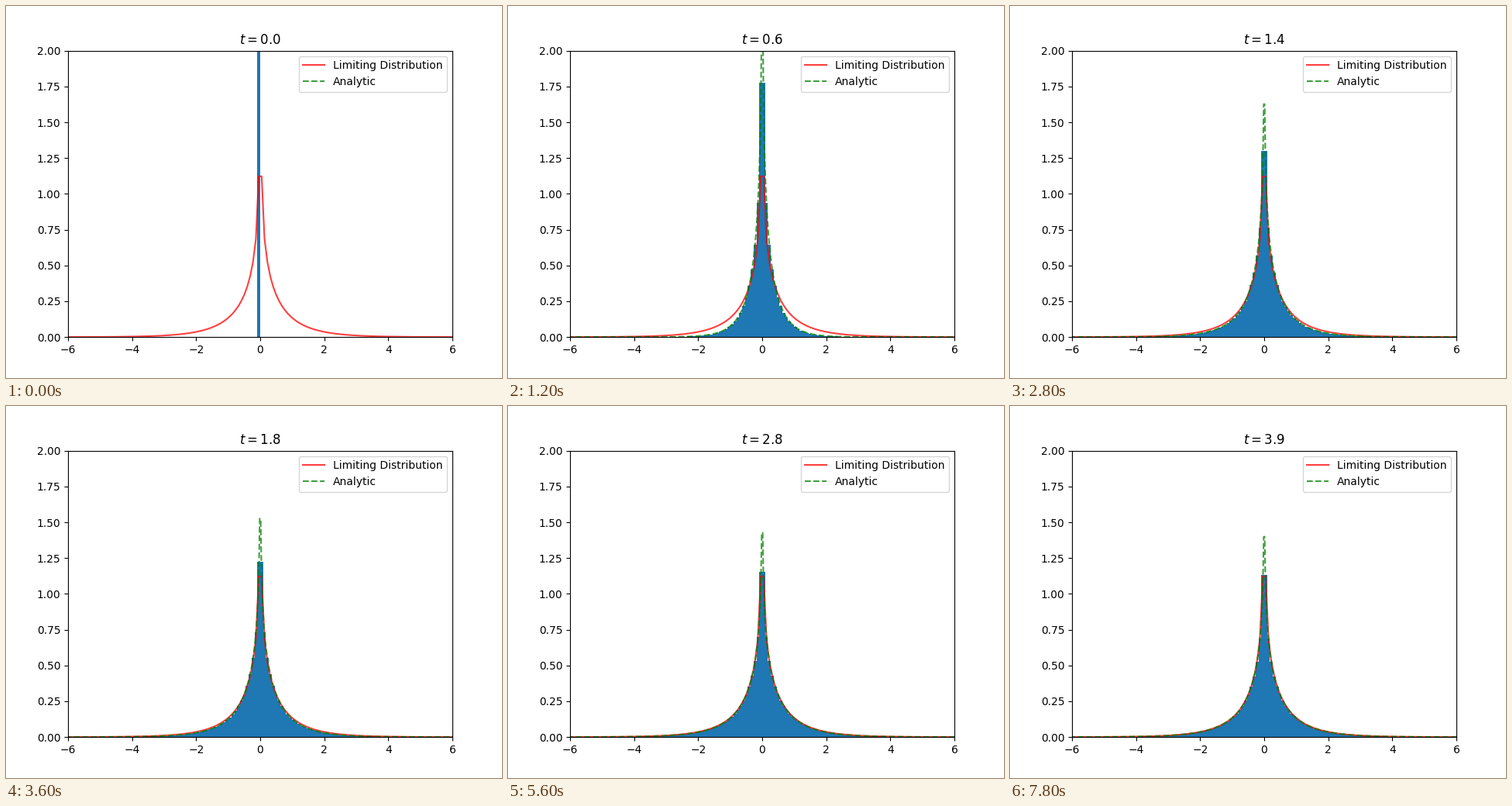
Write a matplotlib script that moves like this. It is 640 by 480 pixels and loops after 8 s.

```python
import numpy as np
import matplotlib.pyplot as plt
from matplotlib.animation import FuncAnimation

FRAMES, INTERVAL = 40, 200
RATE = 1.2      # relaxation rate of the scale
BIN = 0.09      # histogram bin width

U = np.linspace(0, 25, 501)
COSH = np.cosh(U)


def integrate(f):
    """Trapezoid rule along the last axis, over U."""
    return (f.sum(axis=-1) - 0.5 * (f[..., 0] + f[..., -1])) * (U[1] - U[0])


def density(x, scale):
    """Density K0(|x| / scale) / (pi * scale)."""
    z = np.abs(x)[:, None] / scale
    return integrate(np.exp(-z * COSH)) / (np.pi * scale)


def cumulative(x, scale):
    """Probability between 0 and x."""
    z = np.abs(x)[:, None] / scale
    return np.sign(x) * integrate(-np.expm1(-z * COSH) / COSH) / np.pi


def bin_heights(scale):
    if scale == 0:
        return np.where(np.arange(len(edges) - 1) == zero_bin, 1 / BIN, 0.0)
    return np.diff(cumulative(edges, scale)) / BIN


edges = BIN * np.arange(-100, 101)
zero_bin = 99
x = np.linspace(-10, 10, 700)

fig, ax = plt.subplots(figsize=(6.4, 4.8), dpi=100)
bars = ax.bar(edges[:-1], bin_heights(0), width=BIN, align="edge", color="C0")
ax.plot(edges[:-1] + BIN / 2, bin_heights(1), color="red", alpha=0.75,
        label="Limiting Distribution")
curve, = ax.plot(x, np.full_like(x, np.nan), "--", color="green", alpha=0.75,
                 label="Analytic")
ax.set_xlim(-6, 6)
ax.set_ylim(0, 2)
ax.legend(loc="upper right")
title = ax.set_title("$t = 0.0$")


def update(i):
    t = i / 10
    scale = 1 - np.exp(-RATE * t)
    for bar, h in zip(bars, bin_heights(scale)):
        bar.set_height(h)
    curve.set_ydata(density(x, scale) if t > 0 else np.full_like(x, np.nan))
    title.set_text(f"$t = {t:.1f}$")
    return [*bars, curve, title]


anim = FuncAnimation(fig, update, frames=FRAMES, interval=INTERVAL,
                     repeat=True, repeat_delay=0)
plt.show()
```
